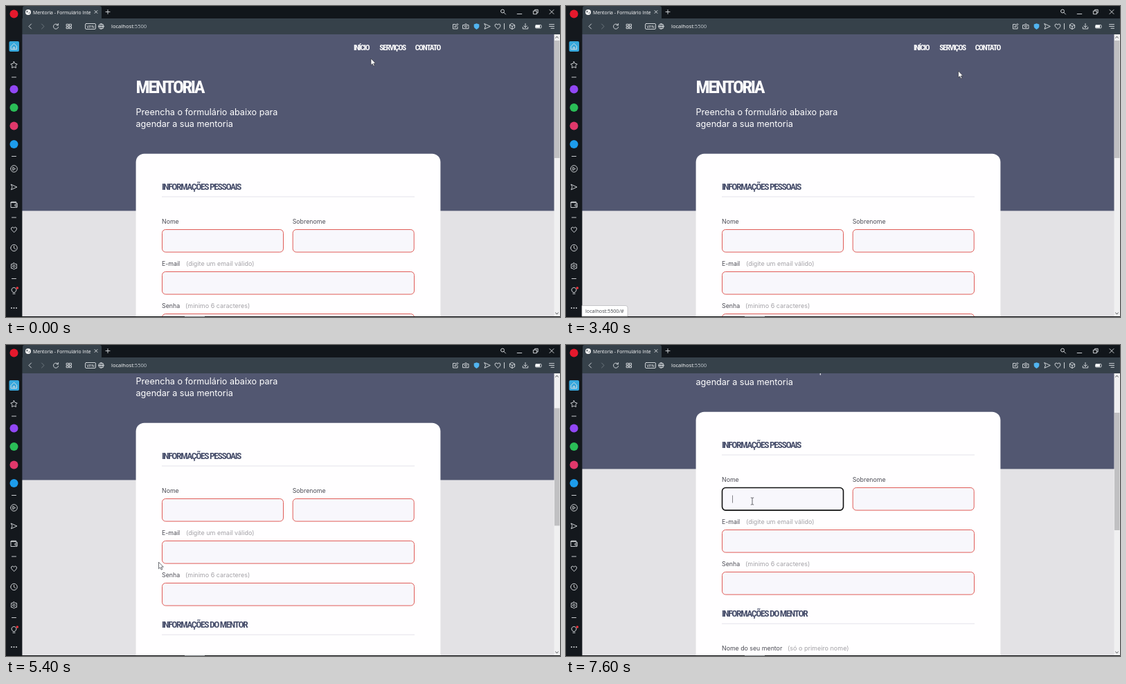
An HTML page for the animation above (8 s loop, 800 by 450 pixels).

```html
<!DOCTYPE html>
<html lang="pt">
<head>
<meta charset="utf-8">
<title>Mentoria</title>
<style>
  html, body { margin: 0; width: 100%; height: 100%; overflow: hidden; background: #14181d; }
  svg { display: block; }
  text { font-family: Inter, sans-serif; font-size: 8.8px; fill: #4c4c55; }
  .ui { font-family: "Open Sans", sans-serif; font-size: 7.6px; font-weight: 500; fill: #fff; }
  .display {
    font-family: "Roboto Condensed", Roboto, sans-serif;
    font-stretch: 75%; font-weight: 700; letter-spacing: -.1em;
  }
  .title { font-size: 26.5px; fill: #fff; letter-spacing: -.09em; }
  .lead { font-size: 12.6px; fill: #fff; }
  .section { font-size: 13.5px; fill: #474e6b; }
  .link { font-size: 11.3px; fill: #fff; text-anchor: middle; }
  .link.hover { fill: #686870; }
  .hint { font-size: 9px; fill: #a3a1a6; }
  .field { fill: #f8f7fc; stroke: #e05c57; }
  .field.focus { stroke: #111; stroke-width: 1.6; }
  .icon { fill: none; stroke: #dfe3e6; stroke-width: .9; stroke-linecap: round; stroke-linejoin: round; }
  .pointer { fill: #fff; stroke: #33343d; stroke-width: .7; stroke-linejoin: round; }
</style>
</head>
<body>
<svg width="800" height="450" viewBox="0 0 800 450">
  <defs>
    <clipPath id="view"><rect x="23" y="41" width="769" height="408"/></clipPath>
  </defs>

  <g clip-path="url(#view)">
    <rect x="23" y="41" width="769" height="408" fill="#e3e2e5"/>
    <g id="page">
      <rect x="23" y="41" width="769" height="255.4" fill="#525771"/>
      <text class="display link" x="513.2" y="64">INÍCIO</text>
      <text class="display link" x="558.2" y="64">SERVIÇOS</text>
      <text class="display link" x="609" y="64">CONTATO</text>
      <text class="display title" x="187.5" y="126">MENTORIA</text>
      <text class="lead" x="187.5" y="157.9">Preencha o formulário abaixo para</text>
      <text class="lead" x="187.5" y="175.4">agendar a sua mentoria</text>
      <rect x="187.6" y="213.8" width="439.8" height="500" rx="12" fill="#fffeff"/>
      <g id="form"></g>
    </g>
  </g>

  <rect x="791.5" y="41" width="8.5" height="408" fill="#f0f0f1"/>
  <rect id="thumb" x="792" y="50" width="7.5" height="170" fill="#c0c0c2"/>
  <path d="M793.5 46.5l2-2.5 2 2.5M793.5 443.5l2 2.5 2-2.5" fill="none" stroke="#55585c"/>

  <rect width="800" height="18" fill="#11161b"/>
  <path d="M24 18V3q0-3 3-3H135q3 0 3 3V18z" fill="#36414a"/>
  <rect x="23" y="18" width="777" height="23" fill="#36414a"/>
  <rect width="23.4" height="450" fill="#14181d"/>
  <rect y="449" width="800" height="1" fill="#101214"/>
  <rect x="258" y="449" width="29" height="1" fill="#777b80"/>

  <text class="ui" x="39" y="11.7" style="font-size:6.8px">Mentoria - Formulário Inte</text>
  <text class="ui" x="152" y="32.2">localhost<tspan fill="#c3cad0">:5500</tspan></text>
  <rect class="icon" x="114.5" y="25.5" width="15" height="8" rx="1.5"/>
  <text class="ui" x="116.5" y="31.7" style="font-size:5.8px">VPN</text>
  <g id="icons"></g>

  <g id="status">
    <path d="M23 433.5H86q3 0 3 3V449H23z" fill="#fff" stroke="#b5b5b8" stroke-width=".7"/>
    <text class="ui" x="28" y="443.6" style="font-size:7.2px;font-weight:400;fill:#45484d">localhost:5500/#</text>
  </g>

  <path id="caret" d="M240.5 217.5V228.5" stroke="#77777c" stroke-width=".9"/>
  <g id="pointer">
    <path id="arrow" class="pointer" d="M0 0V9.6L2.2 7.6 3.7 11 5.3 10.3 3.8 7H6.8z"/>
    <path id="hand" class="pointer" d="M-1.1 1Q0-.7 1.1 1V4.6L5.2 5.6Q6.2 6 6 7.4L5 13H-.5L-3.6 8.6Q-4 7-2.6 7.2L-1.1 8.4z"/>
    <path id="beam" class="icon" style="stroke:#55565c" d="M-1.8-5H-.5L0-4.5.5-5H1.8M0-4.5V4.5M-1.8 5H-.5L0 4.5.5 5H1.8"/>
  </g>
</svg>

<script>
const $ = id => document.getElementById(id);

// Form
const heading = (label, y) =>
  `<text class="display section" x="225" y="${y}">${label}</text>
   <path d="M225 ${y + 9.8}H590" stroke="#e4e3ea"/>`;
const field = (label, x, y, width, hint = "", hintX = 0) =>
  `<text x="${x}" y="${y}">${label}</text>
   <text class="hint" x="${hintX}" y="${y}">${hint}</text>
   <rect class="field" x="${x + .5}" y="${y + 8.8}" width="${width - 1}" height="32.6" rx="5"/>`;

$("form").innerHTML =
  heading("INFORMAÇÕES PESSOAIS", 266.2) +
  field("Nome", 225, 314.7, 176) +
  field("Sobrenome", 413.7, 314.7, 176) +
  field("E-mail", 225, 375.7, 365, "(digite um email válido)", 260) +
  field("Senha", 225, 436.7, 365, "(minimo 6 caracteres)", 259) +
  heading("INFORMAÇÕES DO MENTOR", 510.4) +
  field("Nome do seu mentor", 225, 558.8, 365, "(só o primeiro nome)", 320);

// Icons are drawn around their own centre
const ring = r => `M${-r} 0a${r} ${r} 0 1 0 ${2 * r} 0a${r} ${r} 0 1 0 ${-2 * r} 0`;
const shape = {
  back: "M1.5-3.5L-2 0 1.5 3.5",
  forward: "M-1.5-3.5L2 0-1.5 3.5",
  reload: "M3 -2A3.6 3.6 0 1 0 3.6 1M3.4-4V-1.6H1",
  grid: "M-3.5-3.2h2.8v2.6h-2.8zM.7-3.2h2.8v2.6H.7zM-3.5.6h2.8v2.6h-2.8zM.7.6h2.8v2.6H.7z",
  globe: ring(3.7) + "M-3.7 0H3.7M0-3.7Q-3.4 0 0 3.7Q3.4 0 0-3.7",
  land: "M-2.6-1.6L-.4-2.2-1 .4-2.2.2zM.6 1.2L2.4-.4 1.6 2.2z",
  edit: "M0-3H-3.5V3.5H3V.5M-1 1L-.7-.6 3-4 4-3 .5.7z",
  camera: "M-4-2H-2L-1-3.4H1L2-2H4V3.2H-4z" + ring(1.5),
  send: "M-4-3.8L4.3 0-4 3.8-2.6 0z",
  heart: "M0 3.8L-3.8 0Q-4.8-3.3-2-3.5Q-.5-3.4 0-2Q.5-3.4 2-3.5Q4.8-3.3 3.8 0z",
  divider: "M0-4V4",
  cube: "M0-4L3.6-2V2L0 4-3.6 2V-2zM-3.6-2L0 0 3.6-2M0 0V4",
  download: "M0-4V1.5M-2.2-.7L0 1.5 2.2-.7M-3.7 1V3.5H3.7V1",
  menu: "M-3.5-2.8H3.5M-3.5 0H3.5M-1 2.8H3.5",
  search: "M.5.5L3.5 3.5M-3.5-1a2.5 2.5 0 1 0 5 0a2.5 2.5 0 1 0-5 0",
  minimize: "M-3.3 3H3.3",
  restore: "M-3.2-1.4H1.4V3.2H-3.2zM-1.4-1.6V-3.2H3.2V1.4H1.6",
  close: "M-3-3L3 3M3-3L-3 3",
  smallClose: "M-2-2L2 2M2-2L-2 2",
  plus: "M-3 0H3M0-3V3",
  home: "M-4-.3L0-4.3 4-.3V4.2H-4zM-1.2 4V1.2H1.2V4",
  star: "M0-4.6L1.5-1.6 4.7-1 2.5 1.3 2.9 4.5 0 3.2-2.9 4.5-2.5 1.3-4.7-1-1.5-1.6z",
  rule: "M-3 0H3",
  play: ring(4.8) + "M-1.3-2L2 0-1.3 2z",
  wallet: "M-4.5-3H3V-4.2H-3.6Q-4.5-4-4.5-3V4H4.5V-2.5H3M4.5-.5H1.5V2H4.5",
  clock: ring(4.7) + "M0-2.7V.3L2 1.6",
  gear: ring(1.7) + "M0-4.8L1.3-3.4 3.9-3 4 0 3.9 3 1.3 3.4 0 4.8-1.3 3.4-3.9 3-4 0-3.9-3-1.3-3.4z",
  bulb: "M-1.7 2.2Q-4-.2-3.4-2.2Q-2-4.8 0-4.6Q2-4.8 3.4-2.2Q4-.2 1.7 2.2zM-1.5 4.4H1.5"
};
const icon = (name, x, y, extra = "") =>
  `<path class="icon" d="${shape[name]}" transform="translate(${x} ${y})" style="${extra}"/>`;
const dot = (x, y, r, color) => `<circle cx="${x}" cy="${y}" r="${r}" fill="${color}"/>`;
const row = (y, items) => Object.entries(items).map(([name, x]) => icon(name, x, y)).join("");
const column = items => items.map(([name, y]) => icon(name, 11.5, y)).join("");

$("icons").innerHTML =
  row(29.5, { back: 35, reload: 72, grid: 91, globe: 137.5, edit: 649, camera: 664, send: 695,
    heart: 710, divider: 719.5, cube: 731, download: 750, menu: 788 }) +
  icon("forward", 53, 29.5, "stroke:#737d85") +
  row(8.5, { smallClose: 130, plus: 147, search: 718, minimize: 741.5, restore: 765, close: 788 }) +
  dot(32, 9, 4, "#f4f4f4") + icon("land", 32, 9, "fill:#4b545c;stroke:none") +
  `<path d="M679.5 25.3l3.8 1.2v3.4q-.6 2.8-3.8 4.2q-3.2-1.4-3.8-4.2v-3.4z" fill="#51b4f0"/>
   <rect class="icon" x="764.5" y="27.5" width="8.5" height="4.5" rx="1"/>
   <rect x="765" y="28" width="6" height="3.5" fill="#fff"/>
   <rect x="4.5" y="51" width="14.5" height="15" rx="2" fill="#36a7dc"/>` +
  dot(11.5, 11.5, 6, "#e5192d") +
  dot(11.5, 120.5, 6, "#9147f5") +
  dot(11.5, 147, 6, "#2abd57") +
  dot(11.5, 173.5, 6, "#e0386b") +
  dot(11.5, 200, 6, "#1d9cec") +
  column([["home", 58.5], ["star", 85], ["rule", 103], ["rule", 217.5], ["play", 235.5],
    ["send", 262], ["wallet", 287.5], ["rule", 306], ["heart", 323.5], ["clock", 350],
    ["gear", 376.5], ["rule", 394.5], ["bulb", 412]]) +
  dot(16.3, 408, 1.8, "#f0323c") +
  [8, 11.5, 15].map(x => dot(x, 437, .9, "#e4e7ea")).join("");

// Motion: [time, value...] keys, linear in between
const pointerKeys = [
  [0, 527, 76], [200, 525, 74], [600, 512, 62], [800, 509, 60.5], [1100, 510, 60],
  [1400, 528, 61], [1800, 562, 60], [2200, 577, 60], [2400, 579, 60], [2600, 590, 60],
  [2800, 613, 60], [3200, 613, 60], [3600, 520, 128], [4000, 330, 255], [4400, 230.5, 315.5],
  [5000, 230.5, 315.5], [5600, 215.5, 313.5], [5800, 216, 312], [6200, 238, 258],
  [6600, 269, 226], [8000, 269, 226]
];
const scrollKeys = [[0, 0], [4600, 0], [4800, 24], [5000, 58.5], [5200, 61], [5400, 101], [5600, 117], [8000, 117]];

function sample(keys, time) {
  const next = keys.findIndex(key => key[0] > time);
  const a = keys[next - 1], b = keys[next];
  const p = (time - a[0]) / (b[0] - a[0]);
  return a.slice(1).map((value, i) => value + (b[i + 1] - value) * p);
}

const STEP = 200, LOOP = 8000, FOCUS = 6600;
const links = [...document.querySelectorAll(".link")];
const linkSpans = [[502, 526], [539, 580], [590, 628]];
const nameField = document.querySelector(".field");
const show = (id, visible) => $(id).setAttribute("visibility", visible ? "visible" : "hidden");
const move = (id, x, y) => $(id).setAttribute("transform", `translate(${x} ${y})`);

function draw(now) {
  const time = Math.floor(now % LOOP / STEP) * STEP;
  const [x, y] = sample(pointerKeys, time);
  const [scroll] = sample(scrollKeys, time);
  const hovered = y < 68 ? linkSpans.findIndex(([from, to]) => x >= from && x <= to) : -1;
  const inField = time >= 6400;
  const focused = time >= FOCUS;

  move("page", 0, -scroll);
  move("thumb", 0, scroll * 48 / 117);
  move("pointer", x, y);
  links.forEach((link, i) => link.classList.toggle("hover", i === hovered));
  nameField.classList.toggle("focus", focused);
  show("hand", hovered >= 0);
  show("beam", inField);
  show("arrow", hovered < 0 && !inField);
  show("status", time >= 600 && time < 3600);
  show("caret", focused && (time - FOCUS) % 1000 < 500);
}

function tick() {
  draw(performance.now());
  requestAnimationFrame(tick);
}
tick();
</script>
</body>
</html>
```
